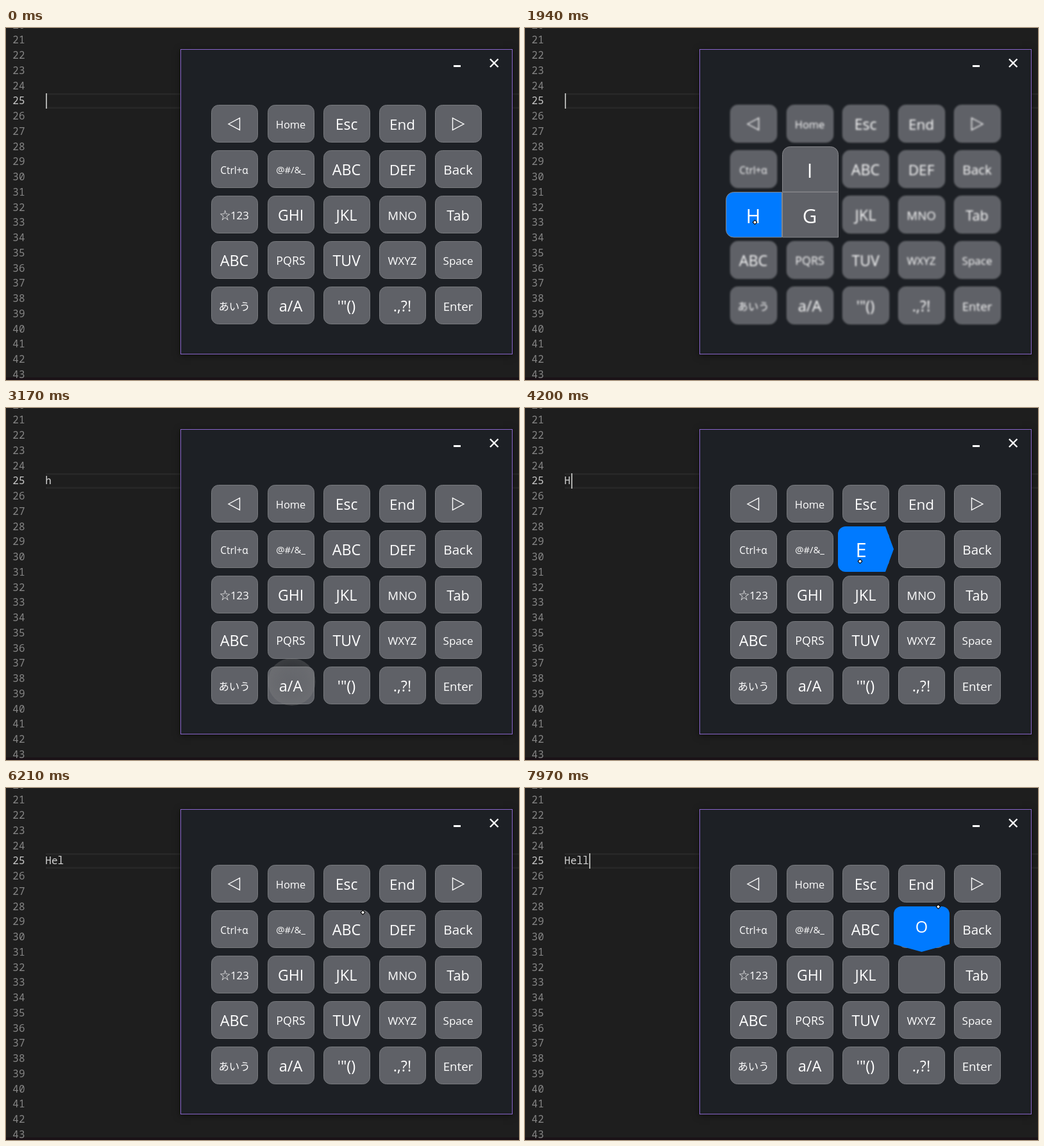
Write an HTML page with a canvas that moves like this. It is 800 by 550 pixels and loops after 8000 ms.

```html
<!DOCTYPE html>
<html lang="en">
<head>
<meta charset="utf-8">
<title>Flick keyboard</title>
<style>
html, body { margin: 0; width: 100%; height: 100%; overflow: hidden; background: #1e1e1e; }
canvas { display: block; width: 800px; height: 550px; }
</style>
</head>
<body>
<canvas id="stage" width="800" height="550"></canvas>
<script>
const LOOP = 8000;
const SANS = '"Open Sans", "Noto Sans CJK JP", "Noto Sans CJK", sans-serif';
const MONO = '"Noto Sans Mono", monospace';
const GRAY = '#5f6167', BLUE = '#007aff';

const ctx = document.getElementById('stage').getContext('2d');
const layer = document.createElement('canvas');
layer.width = 800;
layer.height = 550;
const layerCtx = layer.getContext('2d');

// Rows of [label, font size]
const KEYS = [
  [['◁'], ['Home', 16.4], ['Esc', 23], ['End', 22.5], ['▷']],
  [['Ctrl+α', 15.4], ['@#/&_', 14.8], ['ABC', 23.3], ['DEF', 22.6], ['Back', 20.6]],
  [['☆123', 16.8], ['GHI', 23], ['JKL', 23.5], ['MNO', 18.6], ['Tab', 21.5]],
  [['ABC', 23.3], ['PQRS', 17.8], ['TUV', 23], ['WXYZ', 17.1], ['Space', 17]],
  [['あいう', 16.4], ['a/A', 23.5], ['\'"()', 23.5], ['.,?!', 23.5], ['Enter', 18.7]]
];

// Typed text, by time
const TYPED = [[-100, ''], [2330, 'h'], [3200, 'H'], [4540, 'He'], [5740, 'Hel'], [6900, 'Hell']];

// Flicks: pressed key, direction, letter and time span
const FLICKS = [
  { col: 3, row: 1, dx: -1, dy: 0, letter: 'E', from: 4120, to: 4540 },
  { col: 2, row: 2, dx: 0, dy: -1, letter: 'L', from: 5290, to: 5740 },
  { col: 2, row: 2, dx: 0, dy: -1, letter: 'L', from: 6500, to: 6900 },
  { col: 3, row: 2, dx: 0, dy: -1, letter: 'O', from: 7810, to: 8100 }
];
const MENU = { from: 1200, to: 2330 };
const TAP = { x: 445.5, y: 428, from: 3080, to: 3340 };
const FADE = 100;

// Pen paths as [time, x, y]; the pen is hidden between them
const PEN = [
  [[370, 721, 225], [720, 443, 300], [1030, 441, 303], [1300, 441, 303], [1850, 358, 303], [2300, 358, 303]],
  [[2970, 358, 303], [3090, 445, 428], [3140, 445, 428]],
  [[3940, 445, 428], [4070, 614, 230], [4190, 522, 239], [4510, 522, 239]],
  [[5010, 522, 239], [5210, 536, 286], [5400, 556, 194], [5700, 556, 194]],
  [[6210, 556, 194], [6420, 536, 286], [6600, 552, 192], [6860, 552, 192]],
  [[7480, 552, 192], [7720, 625, 290], [7950, 644, 185], [8000, 644, 185]]
];

const clamp = v => Math.max(0, Math.min(1, v));
const ease = v => v * v * (3 - 2 * v);
const presence = (span, t) =>
  t < span.from ? 0 : t < span.to ? 1 : clamp(1 - (t - span.to) / FADE);

function text(c, str, x, y, size, { color = '#fff', align = 'center', font = SANS } = {}) {
  c.font = `${size}px ${font}`;
  c.fillStyle = color;
  c.textAlign = align;
  c.fillText(str, x, y);
}

function polygon(c, points) {
  c.beginPath();
  points.forEach(([x, y]) => c.lineTo(x, y));
  c.closePath();
}

function drawEditor(t) {
  ctx.fillStyle = '#1e1e1e';
  ctx.fillRect(0, 0, 800, 550);
  ctx.fillStyle = '#1a1217';
  ctx.fillRect(0, 546, 800, 4);
  ctx.fillStyle = '#282828';
  ctx.fillRect(62, 102, 738, 2.5);
  ctx.fillRect(62, 123.5, 738, 2.5);

  for (let n = 20; n <= 43; n++) {
    text(ctx, n, 29.5, 119.3 + (n - 25) * 23.75, 16,
      { color: n === 25 ? '#c6c6c6' : '#858585', align: 'right', font: MONO });
  }
  const [since, typed] = TYPED.filter(([time]) => time <= t).pop();
  text(ctx, typed, 61.3, 119.3, 16, { color: '#d4d4d4', align: 'left', font: MONO });
  if (Math.floor((t - since + 30) / 500) % 2 === 0) {
    ctx.fillStyle = '#aeafad';
    ctx.fillRect(Math.round(62 + typed.length * 9.6), 102, 2, 24);
  }
}

function drawWindow() {
  ctx.save();
  ctx.shadowColor = 'rgba(0,0,0,.5)';
  ctx.shadowBlur = 10;
  ctx.shadowOffsetY = 2;
  ctx.fillStyle = '#1d2025';
  ctx.fillRect(272, 33, 518, 477);
  ctx.restore();
  ctx.lineWidth = 1;
  ctx.strokeStyle = '#8a66cc';
  ctx.strokeRect(272.5, 33.5, 517, 476);

  ctx.fillStyle = '#fff';
  ctx.fillRect(698, 58, 11, 3);
  ctx.strokeStyle = '#fff';
  ctx.lineWidth = 2.4;
  ctx.beginPath();
  ctx.moveTo(755, 48.5);
  ctx.lineTo(767.5, 61);
  ctx.moveTo(767.5, 48.5);
  ctx.lineTo(755, 61);
  ctx.stroke();
}

function drawKey(c, col, row, blank) {
  const x = Math.round(320.4 + 87.2 * col), y = 120 + 71 * row;
  const [label, size] = KEYS[row][col];
  c.beginPath();
  c.roundRect(x + .5, y + .5, 72, 58, 11);
  c.fillStyle = GRAY;
  c.fill();
  c.lineWidth = 1;
  c.strokeStyle = '#77797d';
  c.stroke();
  if (blank) return;
  const cx = x + 36, cy = y + 30;
  if (size) {
    text(c, label, cx, cy + .36 * size + 1, size);
  } else {
    const s = label === '◁' ? 1 : -1;
    polygon(c, [[cx - 9 * s, cy], [cx + 8.5 * s, cy - 9.3], [cx + 8.5 * s, cy + 9.3]]);
    c.lineWidth = 1.4;
    c.strokeStyle = '#fff';
    c.stroke();
  }
}

function drawKeys(t) {
  layerCtx.clearRect(0, 0, 800, 550);
  const active = FLICKS.find(f => t >= f.from && t < f.to + FADE);
  KEYS.forEach((keys, row) => keys.forEach((_, col) =>
    drawKey(layerCtx, col, row, active && active.col === col && active.row === row)));
  const blur = 1.8 * clamp((t - MENU.from) / 150) * presence(MENU, t);
  ctx.save();
  if (blur > 0) ctx.filter = `blur(${blur}px)`;
  ctx.drawImage(layer, 0, 0);
  ctx.restore();
}

// Top left corner of the popup cell that covers a key
const cellOrigin = (col, row) => [Math.round(313.2 + 87.3 * col), 114 + 71 * row];

function drawMenu(t, penX) {
  const alpha = presence(MENU, t);
  if (!alpha) return;
  const onLeft = penX < 400;
  ctx.save();
  ctx.globalAlpha = alpha;
  const cells = [
    ['I', 1, 1, [12, 12, 0, 0], false],
    ['G', 1, 2, 0, !onLeft],
    ['H', 0, 2, [12, 0, 0, 12], onLeft]
  ];
  for (const [letter, col, row, radii, lit] of cells) {
    const [x, y] = cellOrigin(col, row);
    ctx.beginPath();
    ctx.roundRect(x + .5, y + .5, 87, 70.5, radii);
    ctx.fillStyle = lit ? BLUE : GRAY;
    ctx.fill();
    ctx.lineWidth = 1;
    ctx.strokeStyle = '#85868a';
    ctx.stroke();
    text(ctx, letter, x + 43, y + 48.5, 31);
  }
  ctx.restore();
}

function drawFlick(flick, t) {
  const alpha = presence(flick, t);
  if (!alpha) return;
  const [x, y] = cellOrigin(flick.col + flick.dx, flick.row + flick.dy);
  const w = 87, h = 71, r = 12;
  ctx.save();
  ctx.globalAlpha = alpha;
  ctx.fillStyle = BLUE;
  ctx.beginPath();
  if (flick.dx) {
    ctx.roundRect(x, y, w - 13, h, [r, 0, 0, r]);
    ctx.fill();
    polygon(ctx, [[x + w - 14, y], [x + w - 13, y], [x + w, y + h / 2], [x + w - 13, y + h], [x + w - 14, y + h]]);
    ctx.fill();
    text(ctx, flick.letter, x + 36, y + 48, 31);
  } else {
    ctx.roundRect(x, y, w, h - 12, [r, r, 0, 0]);
    ctx.fill();
    polygon(ctx, [[x, y + h - 13], [x + w, y + h - 13], [x + w, y + h - 12], [x + w / 2, y + h], [x, y + h - 12]]);
    ctx.fill();
    text(ctx, flick.letter, x + 43.5, y + 40.5, 25);
  }
  ctx.restore();
}

function drawTap(t) {
  if (t < TAP.from || t >= TAP.to) return;
  const radius = 37 * clamp((t - TAP.from) / 90);
  const glow = ctx.createRadialGradient(TAP.x, TAP.y, 0, TAP.x, TAP.y, 37);
  glow.addColorStop(0, 'rgba(140,140,140,.12)');
  glow.addColorStop(.6, 'rgba(140,140,140,.2)');
  glow.addColorStop(1, 'rgba(140,140,140,.28)');
  ctx.save();
  ctx.globalAlpha = clamp((TAP.to - t) / 150);
  ctx.globalCompositeOperation = 'lighten';
  ctx.beginPath();
  ctx.arc(TAP.x, TAP.y, radius, 0, 7);
  ctx.fillStyle = glow;
  ctx.fill();
  ctx.restore();
}

function penAt(t) {
  const path = PEN.find(p => t >= p[0][0] && t < p[p.length - 1][0]);
  if (!path) return null;
  const i = path.findIndex(([time]) => time > t);
  const [t0, x0, y0] = path[i - 1], [t1, x1, y1] = path[i];
  const k = ease((t - t0) / (t1 - t0));
  return [x0 + (x1 - x0) * k, y0 + (y1 - y0) * k];
}

function drawPen([x, y]) {
  for (const [r, color] of [[4, '#000'], [2.5, '#fff']]) {
    polygon(ctx, [[x, y - r], [x + r, y], [x, y + r], [x - r, y]].map(([a, b]) => [a + .5, b + .5]));
    ctx.fillStyle = color;
    ctx.fill();
  }
}

function draw(t) {
  const pen = penAt(t);
  drawEditor(t);
  drawWindow();
  drawKeys(t);
  drawMenu(t, pen ? pen[0] : 358);
  FLICKS.forEach(flick => drawFlick(flick, t));
  drawTap(t);
  if (pen) drawPen(pen);
}

const start = performance.now();
function tick() {
  draw((performance.now() - start) % LOOP);
  requestAnimationFrame(tick);
}
tick();
</script>
</body>
</html>
```
